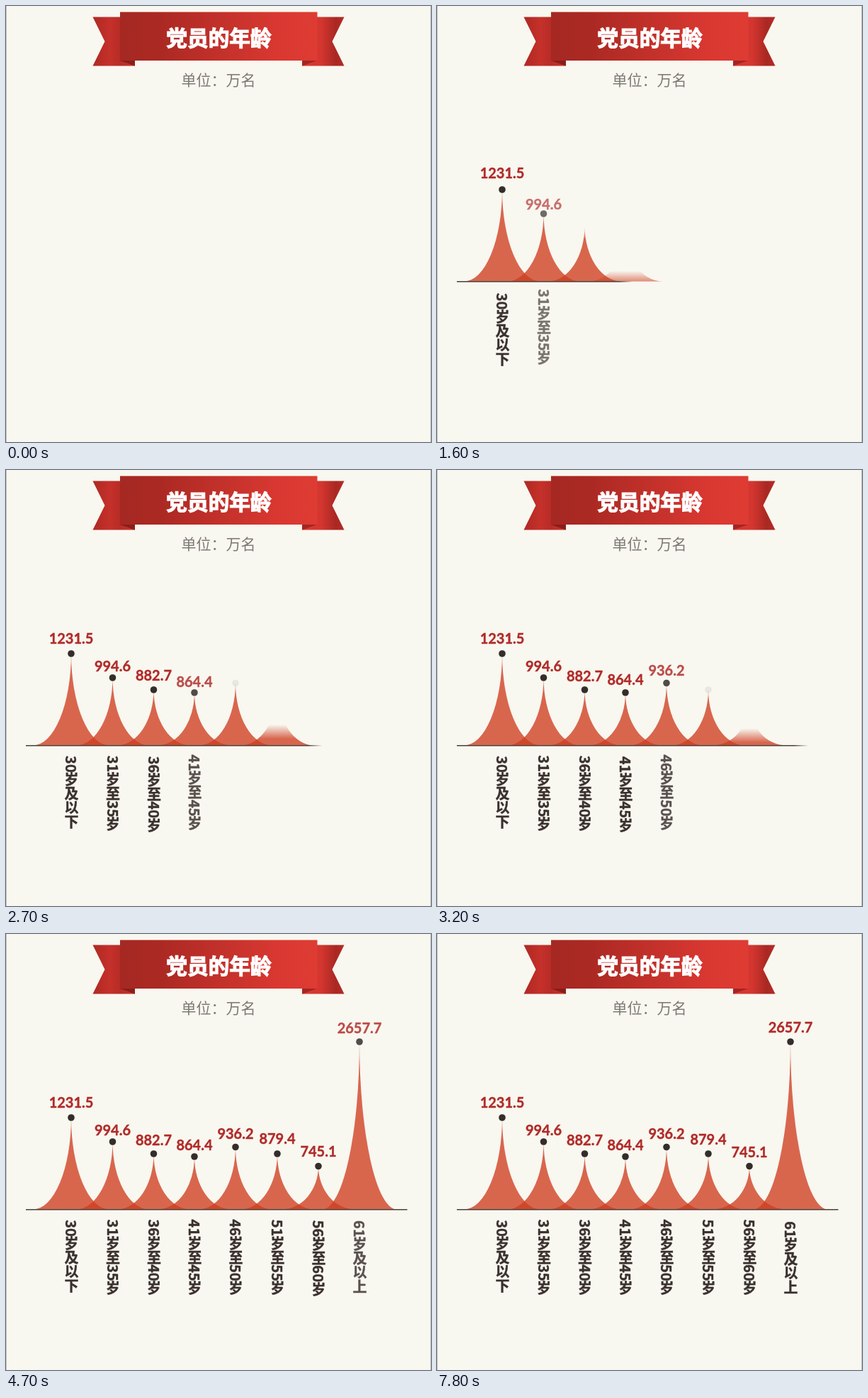
These frames come from a looping animation (600 by 615 pixels, 8 s). An HTML page:

```html
<!DOCTYPE html>
<html lang="zh-CN">
<head>
<meta charset="utf-8">
<style>
  html, body { margin: 0; width: 100%; height: 100%; overflow: hidden; background: #f8f7f0; }
  body { position: relative; font-family: "Noto Sans CJK SC", "Noto Sans CJK", sans-serif; }
  svg { position: absolute; left: 0; top: 0; }
  svg text { text-anchor: middle; }
  .title { font-size: 29.7px; font-weight: 900; fill: #fff; stroke: #fff; stroke-width: 1.2; }
  .unit { font-size: 21px; font-weight: 300; fill: #7f7875; }
  .value { font: 700 20px Lato, sans-serif; fill: #b02b28; stroke: #b02b28; stroke-width: .4; }
  .age { position: absolute; writing-mode: vertical-rl; white-space: nowrap;
         font-size: 20px; font-weight: 700; line-height: 1; color: #3a302d;
         -webkit-text-stroke: .4px #3a302d; }
</style>
</head>
<body>
<svg width="600" height="615" viewBox="0 0 600 615">
  <defs>
    <linearGradient id="front">
      <stop offset="0" stop-color="#a52822"/><stop offset=".2" stop-color="#ab2923"/>
      <stop offset=".8" stop-color="#d93831"/><stop offset="1" stop-color="#de3c33"/>
    </linearGradient>
    <linearGradient id="tailL">
      <stop offset="0" stop-color="#ae2923"/><stop offset=".4" stop-color="#c5302a"/>
      <stop offset=".65" stop-color="#b82c26"/><stop offset="1" stop-color="#c8322b"/>
    </linearGradient>
    <linearGradient id="tailR">
      <stop offset="0" stop-color="#d83a32"/><stop offset=".45" stop-color="#d4362f"/>
      <stop offset=".8" stop-color="#a92823"/><stop offset="1" stop-color="#b42b25"/>
    </linearGradient>
    <linearGradient id="axisFade" gradientUnits="userSpaceOnUse" y1="0" y2="0">
      <stop offset="0" stop-color="#4a403c"/><stop offset="1" stop-color="#4a403c" stop-opacity="0"/>
    </linearGradient>
  </defs>
  <path d="M.5 0V615M599.5 0V615" stroke="#c3c1bc"/>
  <path d="M122.500 15.500H182V84.500H122.500L139.500 50Z" fill="url(#tailL)"/>
  <path d="M477.500 15.500H418V84.500H477.500L460.500 50Z" fill="url(#tailR)"/>
  <path d="M161 77H182V84.500Z" fill="#8a1d19"/>
  <path d="M439 77H418V84.500Z" fill="#a32520"/>
  <rect x="161" y="8.500" width="278.500" height="68.500" fill="url(#front)"/>
  <text class="title" x="300.500" y="55.500">党员的年龄</text>
  <text class="unit" x="300" y="112">单位：万名</text>
  <g id="chart"></g>
  <rect x="28" y="388" width="538.500" height="1.500" fill="url(#axisFade)"/>
</svg>
<script>
const BASE = 388.5, STEP = 500, LOOP = 8000, FEATHER = 10;
// value, age group, centre x, dot y, value centre y, age centre y, half width
const items = [
  ['1231.5', '30岁及以下', 92, 259, 237.5, 455, 54],
  ['994.6', '31岁至35岁', 150.5, 293, 277, 456, 52],
  ['882.7', '36岁至40岁', 208.5, 310, 291, 456, 52],
  ['864.4', '41岁至45岁', 266, 314, 297.5, 456, 52],
  ['936.2', '46岁至50岁', 324, 300.5, 282, 456, 52],
  ['879.4', '51岁至55岁', 383, 310, 289.5, 456, 52],
  ['745.1', '56岁至60岁', 441, 327.5, 308, 456, 52],
  ['2657.7', '61岁及以上', 499, 152, 131.5, 457, 53]
];
const chart = document.getElementById('chart');
const axis = document.getElementById('axisFade');
const clamp = v => Math.max(0, Math.min(1, v));

function add(parent, tag, attrs) {
  const el = document.createElementNS('http://www.w3.org/2000/svg', tag);
  set(el, attrs);
  return parent.appendChild(el);
}
function set(el, attrs) {
  for (const k in attrs) el.setAttribute(k, attrs[k]);
}

// two quarter ellipses meeting in a needle tip
function peakPath(x, top, w) {
  const arc = `A${w} ${BASE - top} 0 0 0 `;
  return `M${x - w} ${BASE}${arc}${x} ${top}${arc}${x + w} ${BASE}Z`;
}

const parts = items.map(([value, age, x, dotY, valueY, ageY, w], i) => {
  const fade = add(chart, 'linearGradient',
    { id: 'fade' + i, gradientUnits: 'userSpaceOnUse', x1: 0, x2: 0 });
  add(fade, 'stop', { offset: 0, 'stop-color': '#cf3d1f', 'stop-opacity': .78 });
  add(fade, 'stop', { offset: 1, 'stop-color': '#cf3d1f', 'stop-opacity': 0 });
  add(chart, 'path', { d: peakPath(x, dotY, w), fill: `url(#fade${i})` });
  return { fade, x, dotY, valueY, ageY, value, age };
});
for (const p of parts) {
  p.dot = add(chart, 'circle', { cx: p.x, cy: p.dotY, r: 4.8, fill: '#342d2a' });
  p.text = add(chart, 'text', { class: 'value', x: p.x });
  p.text.textContent = p.value;
  p.label = document.createElement('div');
  p.label.className = 'age';
  p.label.textContent = p.age;
  p.label.style.left = p.x + 'px';
  p.label.style.top = p.ageY + 'px';
  document.body.append(p.label);
}

function draw(t) {
  const edge = 18 + .155 * t;
  set(axis, { x1: edge - FEATHER, x2: edge + FEATHER });
  parts.forEach((p, i) => {
    const local = t - i * STEP;
    const rise = clamp(local / 750) ** .92;
    const front = BASE + FEATHER - rise * (BASE - p.dotY + 2 * FEATHER);
    set(p.fade, { y1: front + FEATHER, y2: front - FEATHER });
    p.dot.setAttribute('opacity', clamp((local - 650) / 650));

    // labels settle like a damped spring
    const s = Math.max(0, (local - 700) / 1000);
    const shift = 18 * Math.exp(-2.5 * s) * Math.cos(2.7 * s);
    const alpha = clamp(s / .6);
    set(p.text, { y: p.valueY + 7.2 + shift, opacity: alpha });
    p.label.style.opacity = alpha;
    p.label.style.transform = `translate(-50%, -50%) translateY(${-shift}px)`;
  });
}

const start = performance.now();
function tick() {
  draw((performance.now() - start) % LOOP);
  requestAnimationFrame(tick);
}
tick();
</script>
</body>
</html>
```
